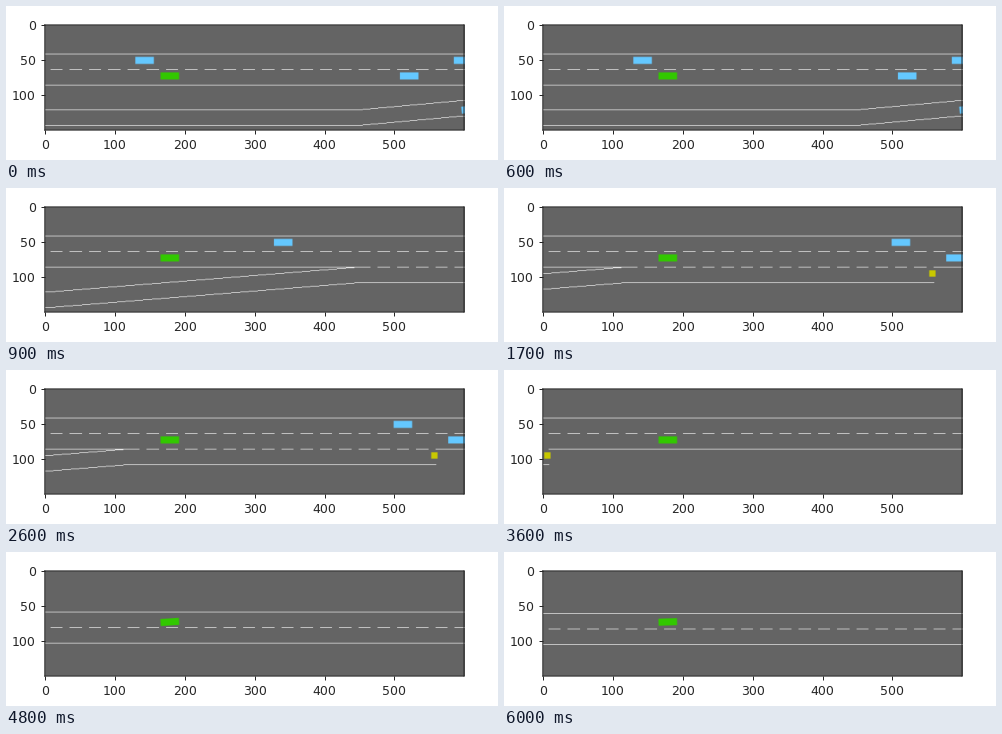
Write a matplotlib script that moves like this. It is 492x154 px and loops after 6.5 s.

```python
import math
from itertools import pairwise

import matplotlib.pyplot as plt
import numpy as np
from matplotlib.animation import FuncAnimation

W, H, DPI = 492, 154, 100
VIEW_W, VIEW_H = 600, 150
SCALE = 5.5                       # view pixels per metre
EGO_X, EGO_Y = 180, 75            # the camera keeps the ego car here
STRIPE, SPACING = 3, 5

ROAD, LINE = (100,) * 3, (230,) * 3
GREEN, BLUE, YELLOW = (50, 200, 0), (100, 200, 255), (200, 200, 0)
CAR, BLOCK = (26.5, 10), (9, 9)

# road sections: straight ramp, bend, merging lane, plain highway
BEND, MERGE, WALL, END = 150, 230, 310, 460
LANE = 4
SPEED = 20                        # ego speed in m/s
CHANGE = 12.5                     # time at which ego starts to change lane

# the viewer refreshes now and then: step -> simulated seconds
BLANK = 8
REFRESH = {0: 0, 9: 4, 17: 7, 35: 12, 38: 12.5, 48: 13.5, 49: 14}

ROWS, COLS = np.mgrid[:VIEW_H, :VIEW_W]


def ramp(x):
    """Centre of the on-ramp, swinging in next to the highway."""
    u = min(max((x - BEND) / (MERGE - BEND), 0), 1)
    return 11.25 + 3.25 * math.cos(math.pi * u)


def road_lines():
    """Yield (start, end, lateral function, striped) for every marking."""
    for a, b in pairwise((0, BEND, MERGE, WALL, END)):
        merging = a == MERGE
        for k in range(3):
            y = (k - 0.5) * LANE
            yield a, b, lambda x, y=y: y, k == 1 or (merging and k == 2)
        if b <= WALL:
            yield a, b, lambda x: ramp(x) + LANE / 2, False
        if b <= MERGE:
            yield a, b, lambda x: ramp(x) - LANE / 2, False


def ego_pose(t):
    """Position and heading; the lane change decays exponentially."""
    rate = 1.55
    x = 101.2 + SPEED * t
    if t <= CHANGE:
        return x, LANE, 0
    y = LANE * math.exp(-rate * (t - CHANGE))
    return x, y, -rate * y / SPEED


def traffic(t, ego_x):
    """Yield the pose of every other car."""
    yield ego_x - 6.5 + 8.2 * t + 0.2 * t * t, 0, 0
    yield ego_x + 62.2 + 6 * t, LANE, 0
    yield ego_x + 76.2 + 6 * t, 0, 0
    # the merging car first surges ahead, then drops back
    x = ego_x + 78.2 + 3.5 * math.sin(math.pi * t / 4.8)
    if x < MERGE:
        yield x, ramp(x), math.atan(ramp(x + 0.5) - ramp(x - 0.5))
    else:
        yield x, LANE, 0


def stroke(view, p, q):
    """One-pixel line from left point p to right point q."""
    (x0, y0), (x1, y1) = p, q
    xs = np.arange(max(x0, 0), min(x1, VIEW_W - 1) + 1)
    if len(xs):
        ys = np.rint(np.interp(xs, [x0, x1], [y0, y1])).astype(int)
        ok = (ys >= 0) & (ys < VIEW_H)
        view[ys[ok], xs[ok]] = LINE


def stamp(view, pos, size, color, heading=0):
    """Soft-edged box turned by its heading."""
    dx, dy = COLS - pos[0] + 2.2, ROWS - pos[1] + 2
    c, s = math.cos(heading), math.sin(heading)
    u, v = abs(dx * c + dy * s), abs(dy * c - dx * s)
    cover = (np.clip(size[0] / 2 - u + 0.5, 0, 1)
             * np.clip(size[1] / 2 - v + 0.5, 0, 1))[..., None]
    view += cover * (np.array(color) - view)


def render(t):
    view = np.full((VIEW_H, VIEW_W, 3), ROAD, float)
    ego_x, ego_y, heading = ego_pose(t)

    def pix(x, y):
        return (math.floor((x - ego_x) * SCALE + EGO_X),
                math.floor((y - ego_y) * SCALE + EGO_Y))

    # lines are only laid out in a window around the camera
    origin = ego_x - EGO_X / SCALE
    near = (int(origin) // SPACING - 27) * SPACING
    far = near + 54 * SPACING + STRIPE
    for start, end, lat, striped in road_lines():
        a, b = max(start, near), min(end, far)
        step, length = (SPACING, STRIPE) if striped else (END, b - a)
        for x in range(a, b, step):
            stroke(view, pix(x, lat(x)),
                   pix(x + length, lat(x + length)))

    for x, y, turn in traffic(t, ego_x):
        stamp(view, pix(x, y), CAR, BLUE, turn)
    stamp(view, pix(ego_x, ego_y), CAR, GREEN, heading)
    stamp(view, pix(WALL, ramp(WALL)), BLOCK, YELLOW)
    return view.astype(np.uint8)


INK = "#262626"
plt.rcParams.update({"font.family": "DejaVu Sans", "font.size": 9.03,
                     "axes.linewidth": 0.72, "axes.edgecolor": INK,
                     "xtick.color": INK, "ytick.color": INK})
fig = plt.figure(figsize=(W / DPI, H / DPI), dpi=DPI, facecolor="white")
left, right, top, bottom = 38.8, 458, 18.9, 124.1
ax = fig.add_axes([left / W, 1 - bottom / H,
                   (right - left) / W, (bottom - top) / H])
image = ax.imshow(render(0), aspect="auto")
ax.set_xticks(range(0, VIEW_W, 100))
ax.set_yticks(range(0, VIEW_H, 50))
ax.tick_params(length=3.16, pad=3.16, width=0.72)
for spine in ax.spines.values():
    spine.set_snap(False)


def update(step):
    ax.set_visible(step != BLANK)
    image.set_data(render(REFRESH[max(s for s in REFRESH if s <= step)]))
    return [image]


anim = FuncAnimation(fig, update, frames=65, interval=100,
                     repeat=True, repeat_delay=0, blit=False)
plt.show()
```
